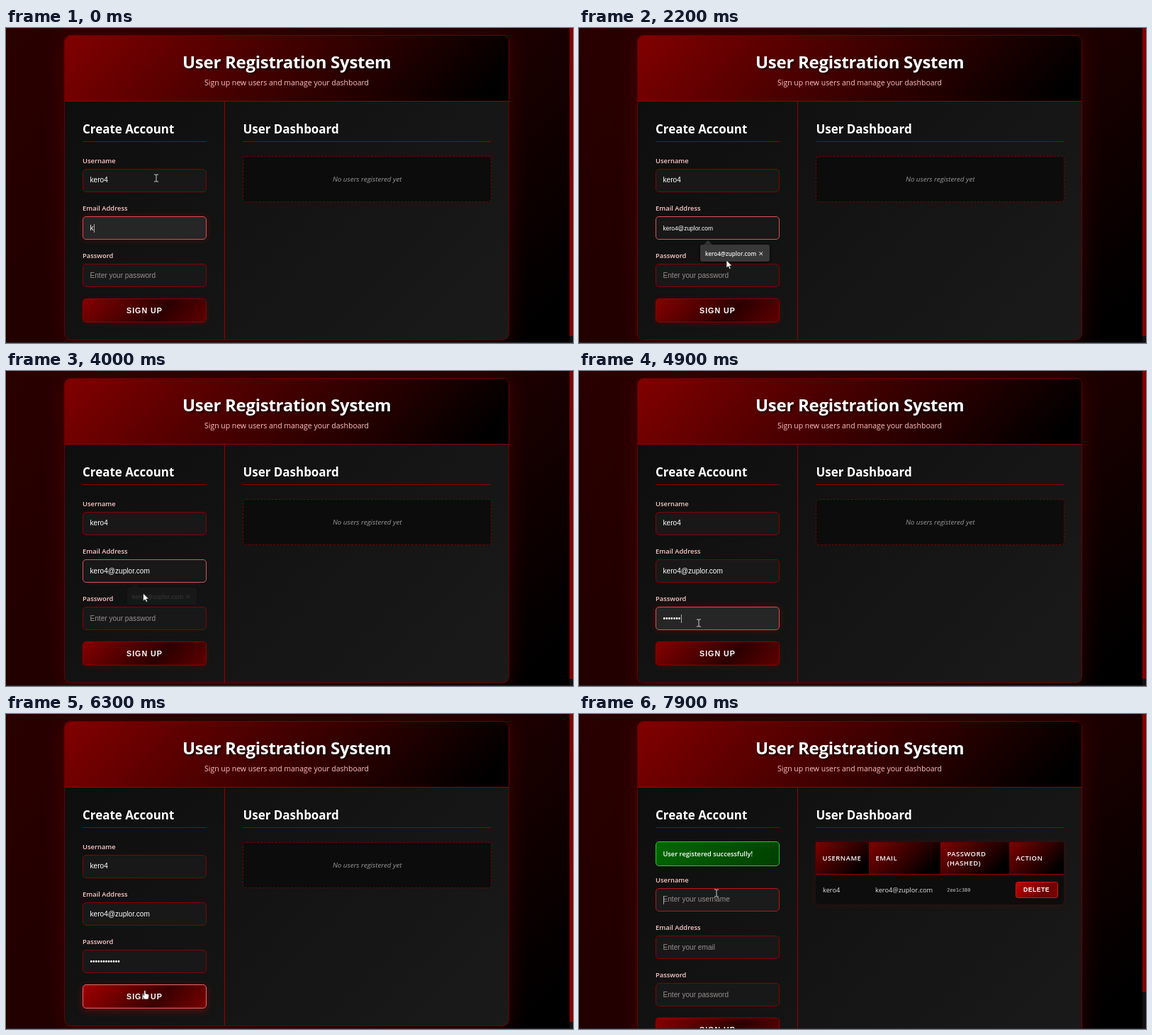
An HTML page that plays this animation: 800 px wide and 445 px high, repeating every 8 s.

```html
<!DOCTYPE html>
<html lang="en">
<head>
<meta charset="utf-8">
<title>User Registration System</title>
<style>
html, body { margin: 0; width: 100%; height: 100%; overflow: hidden; background: #000; }
#stage { position: relative; width: 800px; height: 445px; overflow: hidden; color: #fff;
  background: linear-gradient(135deg, #2a0000, #1c0000 60%, #000 94%);
  font-family: "Open Sans", "Noto Sans", sans-serif; }
#stage div, #stage svg { position: absolute; box-sizing: border-box; }
.t { line-height: 0; white-space: pre; }
.mid { transform: translateX(-50%); }
.card { border: 1px solid #6a0000; border-radius: 9px; box-shadow: 0 5px 32px rgba(139,0,0,.32);
  background: linear-gradient(135deg, #0d0d0d, #1a1a1a); }
.head { border-radius: 8px 8px 0 0; background: linear-gradient(135deg, #820000, #000 94%); }
.line { background: #980000; }
.h1 { font-size: 24px; font-weight: 700; letter-spacing: -.28px; text-shadow: 2px 2px 3px #000a; }
.sub { font-size: 10.46px; color: #ffc4c4; }
.h2 { font-size: 16.95px; font-weight: 700; }
.label { font-size: 9.38px; font-weight: 600; color: #ffc8c8; }
.input { border: 1px solid #8b0000; border-radius: 5px; background: #181818; }
.input.lit { border-color: #e05058; }
.input.soft { border-color: #bd1418; background: #1b1b1b; }
.input.on { border: 1.5px solid #e0484c; background: #262626; box-shadow: 0 0 8px rgba(200,0,0,.35); }
.val { font: 10.1px/0 "Liberation Sans", Arial, sans-serif; }
.val.hint { color: #989090; }
.val.small { font-size: 8.45px; }
.caret { width: 1px; height: 12px; background: #aaa; }
.btn { border: 1px solid #8b0000; border-radius: 5px;
  background: linear-gradient(135deg, #850000, #2b0000 62%, #600000); box-shadow: 0 2px 7px rgba(139,0,0,.3); }
.btn.on { border-color: #f06468; box-shadow: 0 3px 11px rgba(180,0,0,.5);
  background: linear-gradient(135deg, #a00000, #3c0000 62%, #780000); }
.btxt { font: 700 10.7px/0 "Liberation Sans", Arial, sans-serif; letter-spacing: 1px; }
.empty { border: 1px dashed #7e0000; border-radius: 5px; background: #0c0c0c; }
.none { font-size: 9.8px; font-style: italic; color: #979797; }
.table { border-radius: 5px; background: #0d0d0d; box-shadow: 0 0 8px rgba(139,0,0,.3); }
.th { border-bottom: 1px solid #a00000; background: linear-gradient(135deg, #800000, #000 86%); }
.tht { font-size: 9.38px; font-weight: 600; letter-spacing: .5px; }
.td { font-size: 9.25px; color: #e4e4e4; }
.hash { font: 6.85px/0 "DejaVu Sans Mono", monospace; color: #ccc; }
.del { border: 1px solid #cc1a1a; border-radius: 3px; background: linear-gradient(135deg, #c00000, #6a0000 70%, #800000); }
.dtxt { font: 700 8.6px/0 "Liberation Sans", Arial, sans-serif; letter-spacing: .5px; }
.ok { border: 1px solid #2cc82c; border-radius: 5px; background: linear-gradient(135deg, #006800, #003e00); }
.okt { font-size: 9.25px; font-weight: 600; }
.pop { border-radius: 3px; background: #383838; box-shadow: 0 1px 4px #000; }
.tip { border: 6px solid transparent; border-top: 0; border-bottom-color: #383838; }
.popt { font-size: 8px; font-weight: 600; color: #eee; }
.x { font: 9px/0 "DejaVu Sans", sans-serif; color: #ddd; }
.track { background: #141010; }
.thumb { background: #860000; }
.edge { background: #2c2a2a; }
</style>
</head>
<body>
<div id="stage"></div>
<script>
const stage = document.getElementById('stage');
const USER = 'kero4', MAIL = USER + '@zuplor.com', SENT = 6480, SHIFT = 47;

function box(cls, x, y, w, h, parent = stage) {
  const el = document.createElement('div');
  el.className = cls;
  el.style.cssText = `left:${x}px;top:${y}px;width:${w}px;height:${h}px`;
  parent.append(el);
  return el;
}
// y is the middle of the line
function text(cls, x, y, str, parent = stage) {
  const el = box('t ' + cls, x, y, 0, 0, parent);
  el.style.width = 'max-content';
  el.textContent = str;
  return el;
}
const group = () => box('', 0, 0, 0, 0);
const show = (el, on) => el.style.display = on ? '' : 'none';

// Page
const card = box('card', 82, 10, 628, 431);
box('head', 83, 11, 626, 92);
box('line', 83, 103, 626, 1);
const divider = box('line', 308, 104, 1, 336);
text('h1 mid', 396.2, 48.1, 'User Registration System');
text('sub mid', 396, 77.3, 'Sign up new users and manage your dashboard');
text('h2', 108, 142.5, 'Create Account');
text('h2', 334.5, 142.5, 'User Dashboard');
box('line', 108, 160, 175, 1);
box('line', 334, 160, 350, 1);

// Dashboard
const empty = group(), table = group();
box('empty', 334, 181, 351, 65, empty);
text('none mid', 509.7, 214, 'No users registered yet', empty);
box('table', 334, 181, 350, 88, table);
[[334, 409, 'USERNAME'], [409, 510, 'EMAIL'], [510, 607, 'PASSWORD'], [607, 684, 'ACTION']]
  .forEach(([x, end, name]) => {
    box('th', x, 181, end - x, 46, table);
    text('tht', x + 9.5, name == 'PASSWORD' ? 197.5 : 204, name, table);
  });
text('tht', 519.5, 211, '(HASHED)', table);
text('td', 344, 249, USER, table);
text('td', 418, 249, MAIL, table);
text('hash', 519.3, 248.8, '2ee1c380', table);
box('del', 616, 237, 60, 23, table);
text('dtxt', 627, 248.3, 'DELETE', table);

// Form
const ok = group(), form = group();
box('ok', 108, 180, 175, 35, ok);
text('okt', 118.5, 198.3, 'User registered successfully!', ok);
const fields = [['Username', 'username'], ['Email Address', 'email'], ['Password', 'password']]
  .map(([label, hint], i) => {
    const y = 199 + i * 67.1;
    text('label', 108, y - 11.3, label, form);
    return {
      hint: 'Enter your ' + hint,
      box: box('input', 108, y, 175, 33, form),
      val: text('val', 118.5, y + 16.4, '', form),
      caret: box('caret', 119, y + 10.5, 1, 12, form)
    };
  });
const btn = box('btn', 108, 382, 175, 34, form);
text('btxt', 170, 398.6, 'SIGN UP', form);

// Autofill popup
const pop = group();
box('tip', 176, 300, 12, 6, pop);
box('pop', 171, 306, 98, 24, pop);
text('popt', 178, 318.8, MAIL, pop);
text('x', 253, 318.5, '✕', pop);

box('track', 795, 0, 5, 445);
const thumb = box('thumb', 795, 0, 5, 435);
box('edge', 0, 443.5, 800, 1.5);

// Pointer
function pointer(shape) {
  stage.insertAdjacentHTML('beforeend',
    `<svg width="1" height="1" style="left:0;top:0;overflow:visible">${shape}</svg>`);
  return stage.lastElementChild;
}
const pointers = {
  arrow: pointer('<path d="M0 0V11L2.6 8.7 4.4 12.5 6.2 11.7 4.5 8H8Z" fill="#fff" stroke="#111" stroke-width=".7"/>'),
  beam: pointer('<path d="M-3-5H-1Q0-5 0-4Q0-5 1-5H3M0-4V4M-3 5H-1Q0 5 0 4Q0 5 1 5H3" fill="none" stroke="#ccc"/>'),
  hand: pointer('<path d="M-1.2 0Q0-1 1 0V4L5 5Q6 5.5 5.6 8L4.6 12H-1L-3.6 7.5Q-3-0 -2.6 6L-1.2 7Z" fill="#fff" stroke="#222" stroke-width=".7"/>')
};
// time, x, y
const path = [[0, 212, 212], [800, 212, 212], [1700, 208, 328], [2900, 208, 328], [3600, 193.5, 314],
  [4060, 193.5, 314], [4330, 169, 356], [5450, 169, 356], [6100, 196, 391], [6850, 196, 391],
  [7550, 194, 253], [8000, 194, 253]];

function mouseAt(t) {
  const i = path.findIndex(p => p[0] > t), [t0, x0, y0] = path[i - 1], [t1, x1, y1] = path[i];
  const k = (t - t0) / (t1 - t0), e = k * k * (3 - 2 * k);
  return [x0 + (x1 - x0) * e, y0 + (y1 - y0) * e];
}

function setField(f, value, look, small, caret) {
  f.box.className = 'input ' + look;
  f.val.textContent = value || f.hint;
  f.val.className = 't val' + (value ? '' : ' hint') + (small ? ' small' : '');
  show(f.caret, caret);
  f.caret.style.left = 118.5 + (value ? f.val.offsetWidth : 0) + 'px';
}

function draw(t) {
  const sent = t >= SENT, dy = sent ? SHIFT : 0, [x, y] = mouseAt(t);
  const picked = t >= 3830, preview = !picked && y > 306, filled = picked || preview;
  const dots = Math.max(0, Math.min(12, Math.floor((t - 4400) / 70)));
  const focus = t < 4350 ? 1 : t < 6230 ? 2 : t >= 7750 ? 0 : -1;
  const look = ['soft', filled ? 'lit' : 'on', 'on'][focus];
  const blink = t % 1000 < 500 || (t > 4400 && t < 5400) || t >= 7750;

  const values = sent ? ['', '', ''] : [USER, filled ? MAIL : USER[0], '•'.repeat(dots)];
  fields.forEach((f, i) => {
    const on = focus == i;
    setField(f, values[i], on ? look : '', i == 1 && preview, on && blink && look != 'lit');
  });

  form.style.top = dy + 'px';
  card.style.height = 431 + dy + 'px';
  divider.style.height = 336 + dy + 'px';
  thumb.style.height = (sent ? 393 : 435) + 'px';
  show(ok, sent); show(table, sent); show(empty, !sent);

  show(pop, t >= 300 && t < 4030);
  pop.style.opacity = Math.min(1, 1 - (t - 3830) / 200);

  const inX = x > 108 && x < 283, fy = y - dy;
  const overBtn = inX && fy > 382 && fy < 416;
  const overInput = inX && [199, 266, 333].some(top => fy > top && fy < top + 33) && !preview;
  btn.className = overBtn ? 'btn on' : 'btn';
  const kind = overBtn ? 'hand' : overInput ? 'beam' : 'arrow';
  for (const name in pointers) {
    show(pointers[name], name == kind);
    pointers[name].style.transform = `translate(${x}px,${y}px)`;
  }
}

const start = performance.now();
function tick() {
  draw((performance.now() - start) % 8000);
  requestAnimationFrame(tick);
}
tick();
</script>
</body>
</html>
```
